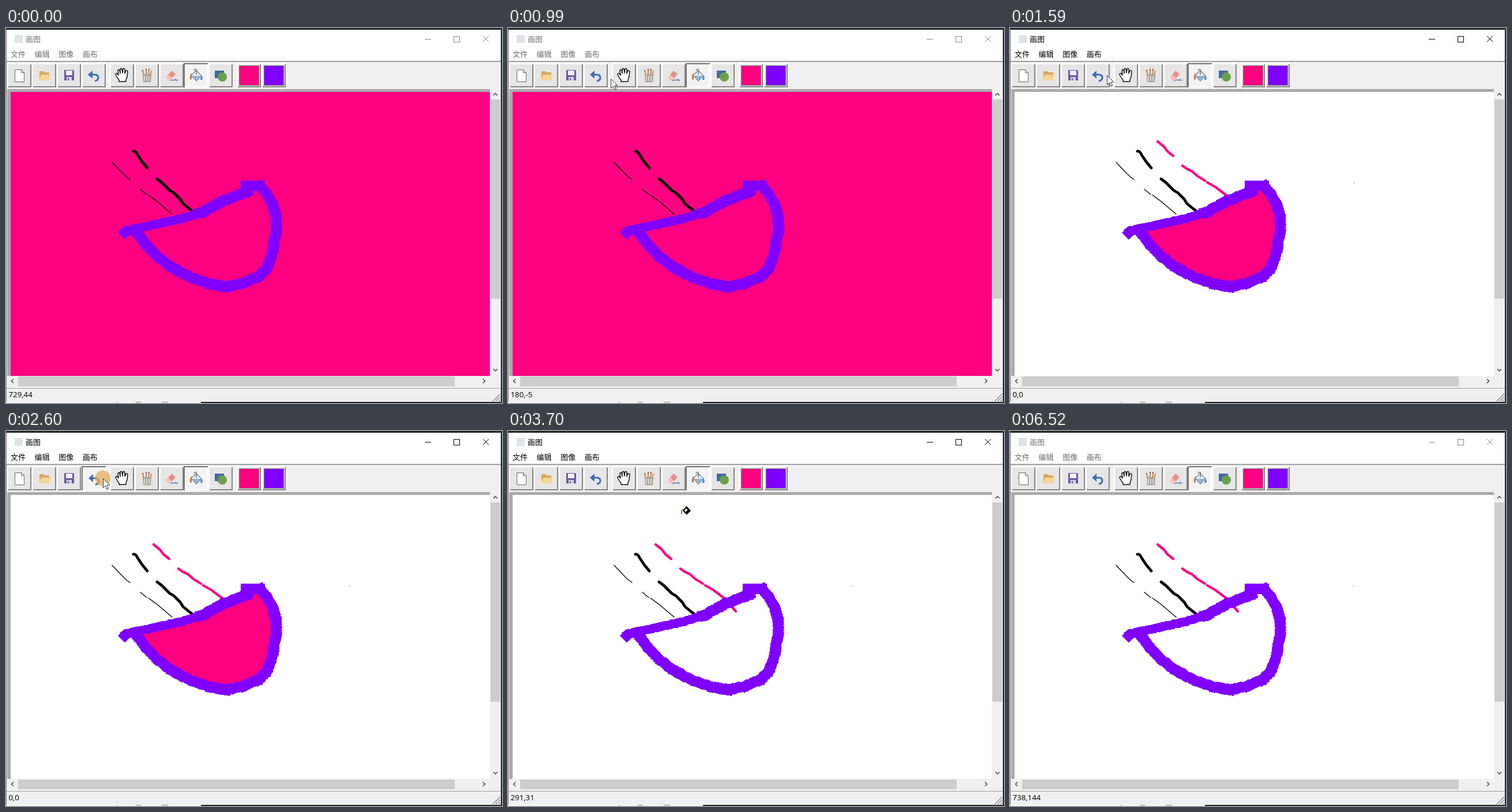
An HTML page for the animation above (6620 ms loop, 860 px wide and 651 px high).

```html
<!DOCTYPE html>
<html lang="zh">
<head>
<meta charset="utf-8">
<title>画图</title>
<style>
  html, body { margin: 0; width: 100%; height: 100%; overflow: hidden; background: #fff; }
  svg { display: block; width: 860px; height: 651px; }
  text { font: 13px "Noto Sans CJK SC", "Noto Sans CJK", sans-serif; }
  #status { font: 13.3px "Open Sans", "Noto Sans", sans-serif; fill: #000; }
  .ui { fill: #000; }
  .glyph { stroke: #000; fill: none; }
  .idle .ui { fill: #777; }
  .idle .menu { fill: #6d6d6d; }
  .idle .glyph { stroke: #888; }
  .crisp { shape-rendering: crispEdges; }
  .line { fill: none; stroke-linecap: round; stroke-linejoin: round; }
</style>
</head>
<body>
<svg id="stage" viewBox="0 0 860 651" class="idle">
  <rect width="860" height="651" fill="#262626"/>
  <rect y="648" width="338" height="3" fill="#fafafa"/>
  <rect x="1" y="3" width="857" height="646" fill="#f0f0f0"/>
  <rect y="3" width="1" height="646" fill="#777"/>
  <rect x="1" y="3" width="856" height="54" fill="#fff"/>
  <rect x="1" y="57" width="857" height="2" fill="#a0a0a0"/>

  <rect x="15" y="12" width="14" height="14" fill="#dfe3e8"/>
  <text class="ui" x="34" y="24">画图</text>
  <g id="menus"></g>
  <path class="glyph crisp" d="M726 19.5h11M776.5 14.5h10v10h-10z"/>
  <path class="glyph" d="M827 14l10 10M837 14l-10 10"/>

  <g id="buttons" class="crisp"></g>

  <!-- toolbar icons -->
  <path d="M15.5 72.500h11l5 5v16h-16z" fill="#fff" stroke="#666"/>
  <path d="M26.500 72.500v5h5" fill="none" stroke="#666"/>
  <path d="M58 75h7l2 2h8v13H58z" fill="#d9a860"/>
  <path d="M61 81h17l-4 10H57z" fill="#f6d595"/>
  <path d="M101 73h16l1 1v17h-17z" fill="#6d5a9c"/>
  <path d="M104 74h11v8h-11z" fill="#f4f2fa"/>
  <path d="M105 85h9v6h-9z" fill="#d8d2e6"/>
  <path d="M107 87h2v4h-2z" fill="#6d5a9c"/>
  <g id="undo">
    <path d="M147 81h7q6 0 6 5t-6 6" fill="none" stroke="#3f6db3" stroke-width="3"/>
    <path d="M142 81l8-7v14z" fill="#3f6db3"/>
  </g>
  <path d="M194 88l-4-7q0-3 3-2l2 3-1-8q1-3 3-1l1 6v-7q1-3 3-1l1 7 1-7q2-2 3 1v7l2-5q3-1 3 2l-1 9-2 5v3h-12v-3z" fill="#fff" stroke="#111" stroke-width="1.500" stroke-linejoin="round"/>
  <path d="M239 83l-2-9M243 82v-10M247 82l1-10M250 83l2-9" fill="none" stroke="#c58a52" stroke-width="2"/>
  <path d="M236 74h2M242 72h2M247 72h2" stroke="#8b3f35" stroke-width="2"/>
  <path d="M237 80h15l-1 14h-13z" fill="#aaa39b"/>
  <path d="M240 83v9M244 83v9M248 83v9" stroke="#ded9d2" stroke-width="2"/>
  <path d="M278 85l9-11 7 6-9 11h-4z" fill="#e99088"/>
  <path d="M278 85l3-4 7 6-3 4h-4z" fill="#f4c2bb"/>
  <path d="M285 92c6-5 5 0 7-1s2-4 3-1 2 0 3 0" fill="none" stroke="#4c78ad" stroke-width="1.300"/>
  <path d="M321 82l9-8 9 9-9 9z" fill="#e8eef3" stroke="#73879a" stroke-width="1.300"/>
  <path d="M322 83h16l-8 8z" fill="#91b5d2"/>
  <path d="M330 81v-9q-3-2-4 2" fill="none" stroke="#666" stroke-width="1.300"/>
  <path d="M322 78q-4 4-3 11 3 2 3-1v-6z" fill="#cb7545"/>
  <path d="M339 82q3 5 1 8-2 1-3-1z" fill="#4c83b8"/>
  <rect x="362" y="74" width="16" height="13" fill="#44689d"/>
  <circle cx="375" cy="85" r="8" fill="#68a04b"/>

  <!-- canvas and scrollbars -->
  <path class="crisp" d="M2 106h838v498H2z" fill="#ababab"/>
  <rect id="paper" x="8" y="111" width="831" height="493"/>
  <rect x="839" y="106" width="18" height="498" fill="#f0f0f0"/>
  <rect x="840" y="124" width="17" height="346" fill="#cdcdcd"/>
  <rect x="21" y="605" width="757" height="17" fill="#cdcdcd"/>
  <path d="M845 117l3.500-3.500 3.500 3.500M845 592l3.500 3.500 3.500-3.500M13 609.500l-3.500 3.500 3.500 3.500M827 609.500l3.500 3.500-3.500 3.500" fill="none" stroke="#444" stroke-width="1.500"/>

  <path id="dot" d="M595 269h2" stroke="#888"/>
  <g class="line" stroke="#000">
    <path d="M184 233l16 17 8 8 7 5M233 280l11 9M247 290l15 11 26 22" stroke-width="1.300"/>
    <path d="M221 214q4-1 7 6l8 12 9 11M262 262l8 6 14 14 7 4M293 288l9 9 5 8 11 9 17 13" stroke-width="4.800"/>
  </g>
  <path class="line" stroke="#ff0080" stroke-width="4.300" d="M256 197l11 9 6 8 10 8M299 239l7 5 10 5 9 8 13 8M342 268l14 8 12 9 8 6 19 22"/>
  <path id="inside" fill="#ff0080"/>
  <path id="bowl" class="crisp" fill="#8000ff"/>

  <!-- status bar -->
  <path class="crisp" d="M1 625.500h857" stroke="#a0a0a0"/>
  <text id="status" x="4.500" y="641"></text>
  <path d="M844 648l13-13M849 648l8-8M854 648l3-3" stroke="#8c8c8c" stroke-width="1.500"/>
  <path d="M193 649v2M225 649.500h9M270 649.500h11" stroke="#888"/>

  <circle id="press" cx="168" cy="82" r="13.500" fill="#e6ab55" opacity=".72"/>
  <path id="arrow" d="M.5.500v16l3.700-3.500 2.600 6.200 2.700-1.200-2.600-6H12z" fill="#fff" stroke="#333"/>
  <g id="pour">
    <path d="M0 8l4-4v3l-2 2v5H0z" fill="#5d8a3c"/>
    <path d="M2 8l8-8 7.500 8.500-8 7.500z" fill="#000" stroke="#fff"/>
    <path d="M5 8l4-4 3 3-4 4zM9 3l-2-3" fill="#fff" stroke="#000"/>
  </g>
</svg>
<script>
const $ = id => document.getElementById(id);
const LOOP = 6620, PINK = '#ff0080', VIOLET = '#8000ff';

$('menus').innerHTML = ['文件', '编辑', '图像', '画布']
  .map((s, i) => `<text class="ui menu" x="${8 + i * 41.6}" y="50">${s}</text>`).join('');

function button(x, down, swatch) {
  const edge = (d, color, w) => `<path d="${d}" fill="none" stroke="${color}" stroke-width="${w}"/>`;
  const upper = `M${x + 1} 103V62H${x + 42}`, lower = `M${x + 41} 62V102H${x}`;
  return `<rect x="${x}" y="61" width="42" height="42" fill="${down ? '#f3f3f3' : '#e6e6e6'}"/>` +
    edge(lower, down ? '#fff' : '#858585', 2) + edge(upper, down ? '#777' : '#fff', 2) +
    (swatch ? `<rect x="${x + 4}" y="65" width="34" height="34" fill="${swatch}" stroke="#777"/>` : '');
}
$('buttons').innerHTML = [2, 45, 88, 131, 180, 223, 266, 308, 351].map(x => button(x, x === 308)).join('') +
  `<g id="undoDown">${button(131, true)}</g>` + button(400, false, PINK) + button(443, false, VIOLET);

// Rim of the bowl as brush centres: the upper edge, then the round side.
const top_ = [[226, 348], [250, 343], [300, 332], [340, 320], [375, 301], [400, 291], [419, 284]];
const side = [[441, 274], [454, 291], [462, 306], [467, 322], [469, 340], [468, 355], [464, 380],
  [459, 400], [452, 417], [438, 432], [408, 444], [382, 449], [355, 445], [320, 433], [288, 416],
  [264, 398], [246, 380], [232, 362], [224, 351]];

let seed = 7;
const rand = () => (seed = seed * 16807 % 2147483647) / 2147483647;

function stamp(x, y, size, angle) {
  const r = size / Math.SQRT2;
  const corner = k => {
    const a = angle + Math.PI / 4 + k * Math.PI / 2;
    return (x + r * Math.cos(a)).toFixed(1) + ' ' + (y + r * Math.sin(a)).toFixed(1);
  };
  return 'M' + [0, 1, 2, 3].map(corner).join('L') + 'z';
}
function brush(points, sizeAt) {
  let d = '';
  for (let i = 1; i < points.length; i++) {
    const [x0, y0] = points[i - 1], [x1, y1] = points[i];
    const dx = x1 - x0, dy = y1 - y0, n = Math.ceil(Math.hypot(dx, dy) / 4);
    for (let k = 0; k <= n; k++) {
      const x = x0 + dx * k / n, y = y0 + dy * k / n;
      d += stamp(x, y, sizeAt(x), Math.atan2(dy, dx) + (rand() - .5) * .5);
    }
  }
  return d;
}
$('bowl').setAttribute('d',
  stamp(206, 355.5, 17, .8) + brush([[207, 353], [226, 348]], () => 15) +
  brush(top_, x => x < 335 ? 14.5 : 18) + brush(side, () => 17.5) +
  'M407 265H449V283H430L415 297L407 290z');
$('inside').setAttribute('d', 'M' + top_.concat(side).join('L') + 'z');

// time, status text, pointer, its place
const steps = [
  [0, '729,44'],
  [290, '816,88', 'pour', 823, 204],
  [390, '668,92', 'pour', 688, 199],
  [490, '506,90', 'pour', 547, 187],
  [590, '408,78', 'pour', 444, 174],
  [690, '318,52', 'pour', 345, 152],
  [790, '243,20', 'pour', 258, 124],
  [890, '180,-5', 'arrow', 192, 97],
  [990, '180,-5', 'arrow', 178, 88],
  [1090, '180,-5', 'arrow', 168, 82],
  [1590, '0,0', 'arrow', 168, 82],
  [3700, '291,31', 'pour', 300, 130],
  [3800, '560,100', 'pour', 502, 215],
  [3900, '738,144']
];
const show = (id, on) => $(id).setAttribute('visibility', on ? 'visible' : 'hidden');
const within = (t, a, b) => t >= a && t < b;

function draw(t) {
  const [, text, pointer, x, y] = steps.filter(s => s[0] <= t).pop();
  if ($('status').textContent !== text) $('status').textContent = text;
  for (const id of ['arrow', 'pour']) {
    show(id, id === pointer);
    if (id === pointer) $(id).setAttribute('transform', `translate(${x} ${y})`);
  }
  const down = within(t, 1490, 1590) || within(t, 2600, 2700);
  show('press', down);
  show('undoDown', down);
  $('undo').setAttribute('transform', down ? 'translate(1 1)' : '');
  $('stage').setAttribute('class', within(t, 1490, 6520) ? '' : 'idle');
  $('paper').setAttribute('fill', t < 1590 ? PINK : '#fff');
  show('inside', t < 2700);
  show('dot', t >= 1590);
}

const start = performance.now();
function tick() {
  draw((performance.now() - start) % LOOP);
  requestAnimationFrame(tick);
}
tick();
</script>
</body>
</html>
```
